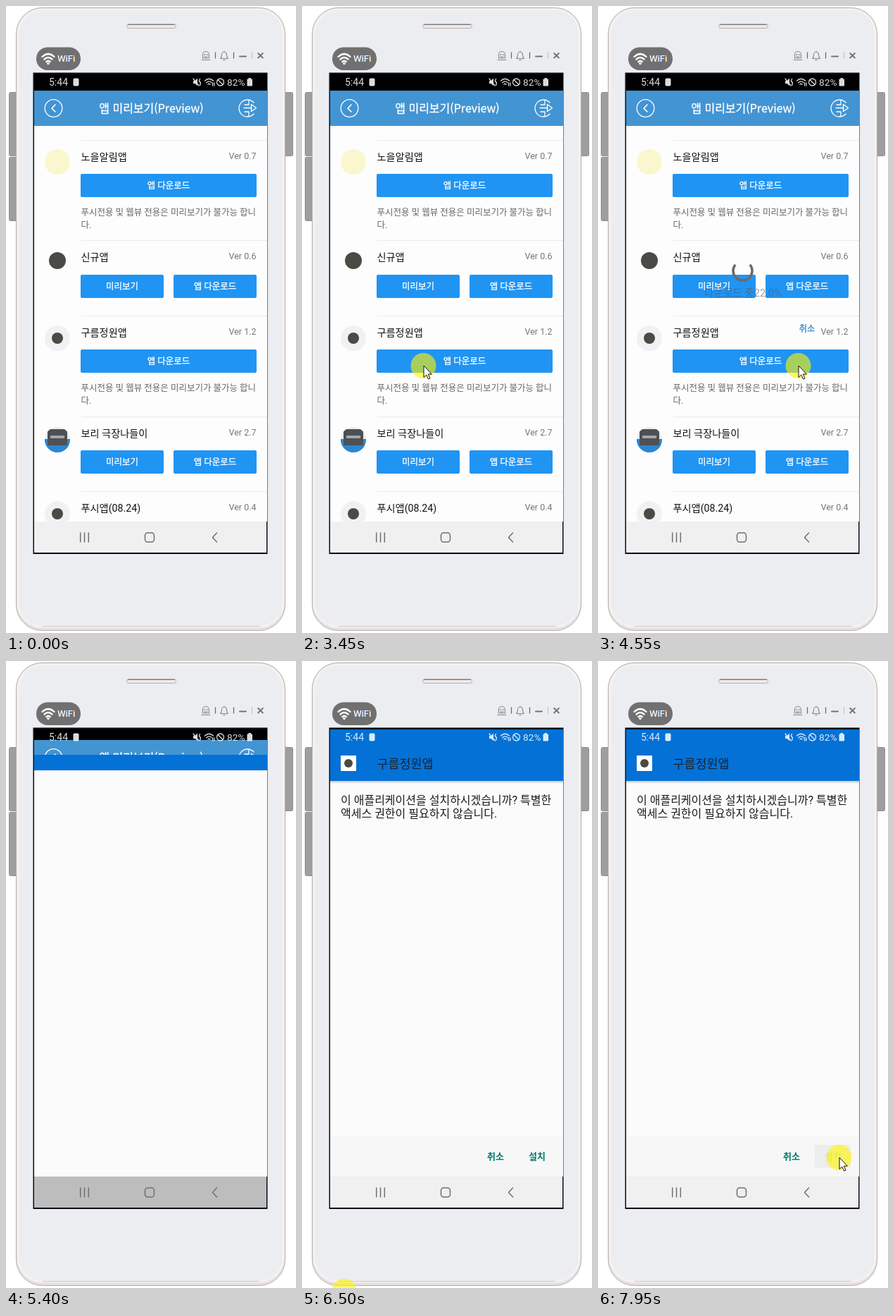
Write an HTML page that moves like this. It is 412 px wide and 889 px high and loops after 8 s.

```html
<!DOCTYPE html>
<html lang="ko">
<head>
<meta charset="utf-8">
<title>App preview</title>
<style>
  html, body { margin: 0; width: 100%; height: 100%; overflow: hidden; background: #fff; }
  svg { display: block; width: 412px; height: 889px; }
  text { font-family: Roboto, "Noto Sans CJK KR", "Noto Sans CJK", sans-serif; white-space: pre; }
  .ko { font-family: "Noto Sans CJK KR", "Noto Sans CJK", sans-serif; }
  .medium { stroke: #fff; stroke-width: .3; }
  .line { fill: none; stroke-linecap: round; stroke-linejoin: round; }
</style>
</head>
<body>
<svg viewBox="0 0 412 889" xmlns="http://www.w3.org/2000/svg">
  <defs>
    <clipPath id="screenClip"><rect x="40" y="97" width="331" height="634"/></clipPath>
    <clipPath id="posterClip"><circle cx="73" cy="615" r="18"/></clipPath>
    <linearGradient id="shade" x2="0" y2="1">
      <stop stop-color="#000" stop-opacity=".22"/><stop offset="1" stop-color="#000" stop-opacity="0"/>
    </linearGradient>
  </defs>

  <!-- phone body -->
  <g fill="#9e9e9e" stroke="#8f8f8f">
    <rect x="4.5" y="122.500" width="14" height="90" rx="2"/>
    <rect x="4.5" y="214.500" width="14" height="90" rx="2"/>
    <rect x="392.500" y="122.500" width="15" height="90" rx="2"/>
  </g>
  <rect x="14.500" y="2.500" width="382" height="883" rx="37" fill="#e6e0df" stroke="#b5adad"/>
  <rect x="17" y="5" width="377" height="875" rx="34.500" fill="#ebedf1" stroke="#f5f1f0" stroke-width="3"/>
  <path d="M52 879.500H360" stroke="#cfc7c7"/>
  <rect x="171.500" y="25.500" width="70" height="6" rx="3" fill="#efe9e8" stroke="#b9afaf"/>
  <path d="M173 26.500H240" stroke="#857c7c"/>

  <!-- mirror tool bar -->
  <rect x="43" y="58.500" width="63" height="32.500" rx="16" fill="#707070"/>
  <g class="line" stroke="#fff" stroke-width="2.400">
    <path d="M51.500 72Q60 64 68.500 72M54.500 75.500Q60 70.500 65.500 75.500M57.300 79Q60 76.500 62.700 79"/>
  </g>
  <circle cx="60" cy="81.500" r="1.800" fill="#fff"/>
  <g font-size="13">
    <text x="72.500" y="79" fill="#2f86ff">WiFi</text>
    <text x="73.500" y="79" fill="#e09a4a">WiFi</text>
    <text x="73" y="79" fill="#fff">WiFi</text>
  </g>
  <g class="line" stroke="#8b8b8b" stroke-width="1.200">
    <path d="M279.500 74V69a4.500 4.500 0 0 1 9 0V74ZM278 76.500H290M282 71.800Q284 73.500 286 71.800"/>
    <path d="M304.500 74.500Q306.500 73 306.500 69.500A3.500 4.500 0 0 1 313.500 69.500Q313.500 73 315.500 74.500ZM308.500 76.500H311.500M310 64V65"/>
    <path d="M297.500 65.500V74.500M323.500 65.500V74.500" stroke="#666" stroke-linecap="butt"/>
    <path d="M349.500 65.500V74.500" stroke="#c4c4c4"/>
    <path d="M332 71.500H341M358.200 67L364.800 73.500M364.800 67L358.200 73.500" stroke="#757575" stroke-width="2"/>
  </g>
  <g fill="#8b8b8b"><circle cx="282.300" cy="69" r="1"/><circle cx="285.700" cy="69" r="1"/></g>

  <!-- screen -->
  <rect x="38.500" y="94.500" width="333" height="682.500" fill="#080c12"/>
  <g clip-path="url(#screenClip)">
    <g id="list">
      <rect x="40" y="80" width="331" height="40" fill="#000"/>
      <rect x="40" y="120" width="331" height="51" fill="#4394d3"/>
      <rect x="40" y="170" width="331" height="600" fill="#fdfdfd"/>
      <g class="line" stroke="#fff" stroke-width="1.300">
        <circle cx="67.500" cy="145" r="12.300"/>
        <path d="M70 140L65 145L70 150" stroke-width="1.600"/>
        <path d="M352 137A12 12 0 1 0 352 153M338 144.500H349M348.500 139.500L355.500 144.500L348.500 149.500ZM345 134V140H339M345 156V150H339"/>
      </g>
      <text class="ko medium" x="206.500" y="150.500" font-size="16" fill="#fff" text-anchor="middle">앱 미리보기(Preview)</text>
      <g id="rows"></g>
      <g id="loader">
        <path id="spin" d="M10.300 -8.700A13.500 13.500 0 1 1 -10.300 -8.700" fill="none" stroke="#6a6a6a" stroke-width="3.600"/>
        <text id="percent" x="206" y="411.500" font-size="14.600" fill="#555" fill-opacity=".55" text-anchor="middle"></text>
        <text x="297" y="461.500" font-size="12.200" fill="#2a86cc" stroke="#2a86cc" stroke-width=".3" text-anchor="middle">취소</text>
      </g>
    </g>
    <g id="installer">
      <rect x="40" y="97" width="331" height="22" fill="#0371d6"/>
      <rect x="40" y="119" width="331" height="620" fill="#fbfbfb"/>
      <g id="details">
        <rect x="40" y="118" width="331" height="52" fill="#0371d6"/>
        <rect x="40" y="170" width="331" height="4" fill="url(#shade)"/>
        <rect x="55" y="134" width="22" height="22" fill="#fff"/>
        <circle cx="66" cy="145" r="6" fill="#4b4b45"/>
        <text x="106.500" y="151.500" font-size="17.400" fill="#1b2430">구름정원앱</text>
        <g font-size="16" fill="#1c1c1c">
          <text x="55" y="203">이 애플리케이션을 설치하시겠습니까? 특별한</text>
          <text x="55" y="222">액세스 권한이 필요하지 않습니다.</text>
        </g>
        <rect x="40" y="673" width="331" height="60" fill="#f7f7f7"/>
        <rect id="press" x="308" y="686" width="51" height="32.500" rx="2" fill="#ededed"/>
        <g font-size="13" font-weight="700" fill="#00796b" text-anchor="middle">
          <text x="275" y="707">취소</text>
          <text id="install" x="334" y="707">설치</text>
        </g>
      </g>
    </g>
  </g>

  <!-- system bars -->
  <g fill="#fff" opacity=".86">
    <text x="61" y="113" font-size="14">5:44</text>
    <text x="314" y="113" font-size="13.700">82%</text>
    <rect x="95.500" y="102.500" width="8" height="11" rx="2"/>
    <path d="M266 106H268.500L272 102.500V113L268.500 110H266Z"/>
    <rect x="342.500" y="103.500" width="7.500" height="10" rx="1"/><rect x="344.500" y="102" width="3.500" height="2"/>
    <g class="line" stroke="#fff" stroke-width="1.300">
      <path d="M266 103L274 113M275.500 103.500L274.300 106L276.500 109L275.500 112.500"/>
      <path d="M282.500 106Q288.500 100.500 294.500 106M284.700 108.700Q288.500 105.200 292 108.500M287 111Q288.500 109.600 290 111M293.500 109V113M295.800 109V113"/>
      <circle cx="304.500" cy="108" r="5"/><path d="M301 104.500L308 111.500"/>
    </g>
  </g>
  <rect id="nav" x="40" y="731" width="330" height="44" fill="#f0f0f0"/>
  <g class="line" stroke="#707070" stroke-width="1.500">
    <path d="M105.700 747V760M111.500 747V760M117.300 747V760"/>
    <rect x="197.500" y="747" width="13" height="13" rx="3.800"/>
    <path d="M299.500 747L293.500 753.500L299.500 760"/>
  </g>

  <g id="pointer">
    <circle r="18" fill="#fff600" fill-opacity=".61"/>
    <path d="M.5 0V16.500L4.200 13L7 19L9.500 18L6.800 12H11.800Z" fill="#fff" stroke="#111" stroke-linejoin="round"/>
  </g>
</svg>

<script>
const LOOP = 8000, STEP = 50;
const $ = id => document.getElementById(id);

const text = (x, y, str, size, fill, extra = '') =>
  `<text x="${x}" y="${y}" font-size="${size}" fill="${fill}" ${extra}>${str}</text>`;
const disc = (x, y, r, fill) => `<circle cx="${x}" cy="${y}" r="${r}" fill="${fill}"/>`;
const button = (x, y, w, label) =>
  `<rect x="${x}" y="${y}" width="${w}" height="33" rx="2" fill="#2094f3"/>` +
  text(x + w / 2, y + 20.5, label, 12.5, '#fff', 'class="medium" text-anchor="middle"');

const badge = y => disc(73, y, 18, '#f1f1f3') + disc(73, y, 8, '#4b4b45');
const poster = `<g clip-path="url(#posterClip)">
  <rect x="55" y="597" width="36" height="36" fill="#e9edf0"/>
  <rect x="55" y="614" width="36" height="20" fill="#2b87d1"/>
  <rect x="59" y="600" width="28" height="23" fill="#4d5156"/>
  <rect x="63" y="609" width="20" height="4" fill="#a3a7aa"/></g>`;

const apps = [
  { y: 190, name: '노을알림앱', ver: '0.7', icon: disc(73, 221, 18, '#faf7cf'), pushOnly: true },
  { y: 332.5, name: '신규앱', ver: '0.6', icon: disc(73, 361, 12, '#4b4b45') },
  { y: 439, name: '구름정원앱', ver: '1.2', icon: badge(471), pushOnly: true },
  { y: 582, name: '보리 극장나들이', ver: '2.7', icon: poster },
  { y: 688.5, name: '푸시앱(08.24)', ver: '0.4', icon: badge(720), pushOnly: true }
];

$('rows').innerHTML = apps.map(({ y, name, ver, icon, pushOnly }) => {
  const top = Math.round(y + 48);
  const actions = pushOnly
    ? button(106, top, 250, '앱 다운로드') +
      text(106.5, y + 106.5, '푸시전용 및 웹뷰 전용은 미리보기가 불가능 합니', 12.5, '#666') +
      text(106.5, y + 125, '다.', 12.5, '#666')
    : button(106, top, 118, '미리보기') + button(238, top, 118, '앱 다운로드');
  return `<path d="M107 ${Math.floor(y) + .5}H371" stroke="#ececec"/>` + icon +
    text(106.5, y + 28.5, name, 14.2, '#111') +
    text(355.5, y + 26.5, 'Ver ' + ver, 12.5, '#777', 'text-anchor="end"') + actions;
}).join('');

// Each track is a list of [time, value, ...]; segments are smoothed unless linear.
function at(track, t, linear) {
  if (t <= track[0][0]) return track[0].slice(1);
  for (let i = 1; i < track.length; i++) {
    const [t0, ...a] = track[i - 1], [t1, ...b] = track[i];
    if (t < t1) {
      const p = (t - t0) / (t1 - t0), k = linear ? p : p * p * (3 - 2 * p);
      return a.map((v, j) => v + (b[j] - v) * k);
    }
  }
  return track[track.length - 1].slice(1);
}

const enterPath = [[2400, 14.5, 454], [3200, 172.5, 510], [3900, 172.5, 510],
  [4450, 284.5, 510], [4950, 284.5, 510], [5200, 270, 797]];
const returnPath = [[6500, 60, 894], [6950, 394, 765], [7300, 342.5, 704]];
const progress = [[3650, 0], [4050, 3], [4550, 22], [4900, 68], [5150, 100]];
const slideIn = [[5300, 72], [5400, 36], [5500, 14], [5600, 5], [5750, 0]];
const slideOut = [[5250, 0], [5400, -8], [5700, -14]];
const reveal = [[5300, 430], [5400, 0]];
const navTone = [[5250, 240], [5350, 189], [5450, 189], [5750, 240]];
const fadeIn = [[5800, 0], [6050, 1]];
const pressed = [[7600, 0], [7800, 1]];

const show = (el, on) => el.setAttribute('visibility', on ? 'visible' : 'hidden');
const move = (el, x, y) => el.setAttribute('transform', `translate(${x} ${y})`);

function draw(t) {
  const back = t >= 6500, spin = (t - 4550) * .3;
  show($('pointer'), back || (t >= 2400 && t < 5250));
  move($('pointer'), ...at(back ? returnPath : enterPath, t));

  show($('loader'), t >= 3650 && t < 5300);
  $('spin').setAttribute('transform', `translate(205.5 375.5) rotate(${spin})`);
  $('percent').textContent = `다운로드 중${at(progress, t, true)[0].toFixed(1)}%`;

  move($('list'), 0, at(slideOut, t)[0]);
  show($('installer'), t >= 5300);
  move($('installer'), 0, at(slideIn, t, true)[0]);
  $('installer').style.clipPath = t < 5400 ? `inset(${at(reveal, t, true)[0]}px 0 0 0)` : 'none';
  $('details').setAttribute('opacity', at(fadeIn, t, true)[0]);

  const tone = Math.round(at(navTone, t, true)[0]);
  $('nav').setAttribute('fill', `rgb(${tone},${tone},${tone})`);
  const hold = at(pressed, t, true)[0];
  $('press').setAttribute('opacity', hold);
  $('install').setAttribute('opacity', 1 - hold * .85);
}

const start = performance.now();
function tick() {
  const t = (performance.now() - start) % LOOP;
  draw(Math.floor(t / STEP) * STEP);
  requestAnimationFrame(tick);
}
tick();
</script>
</body>
</html>
```
